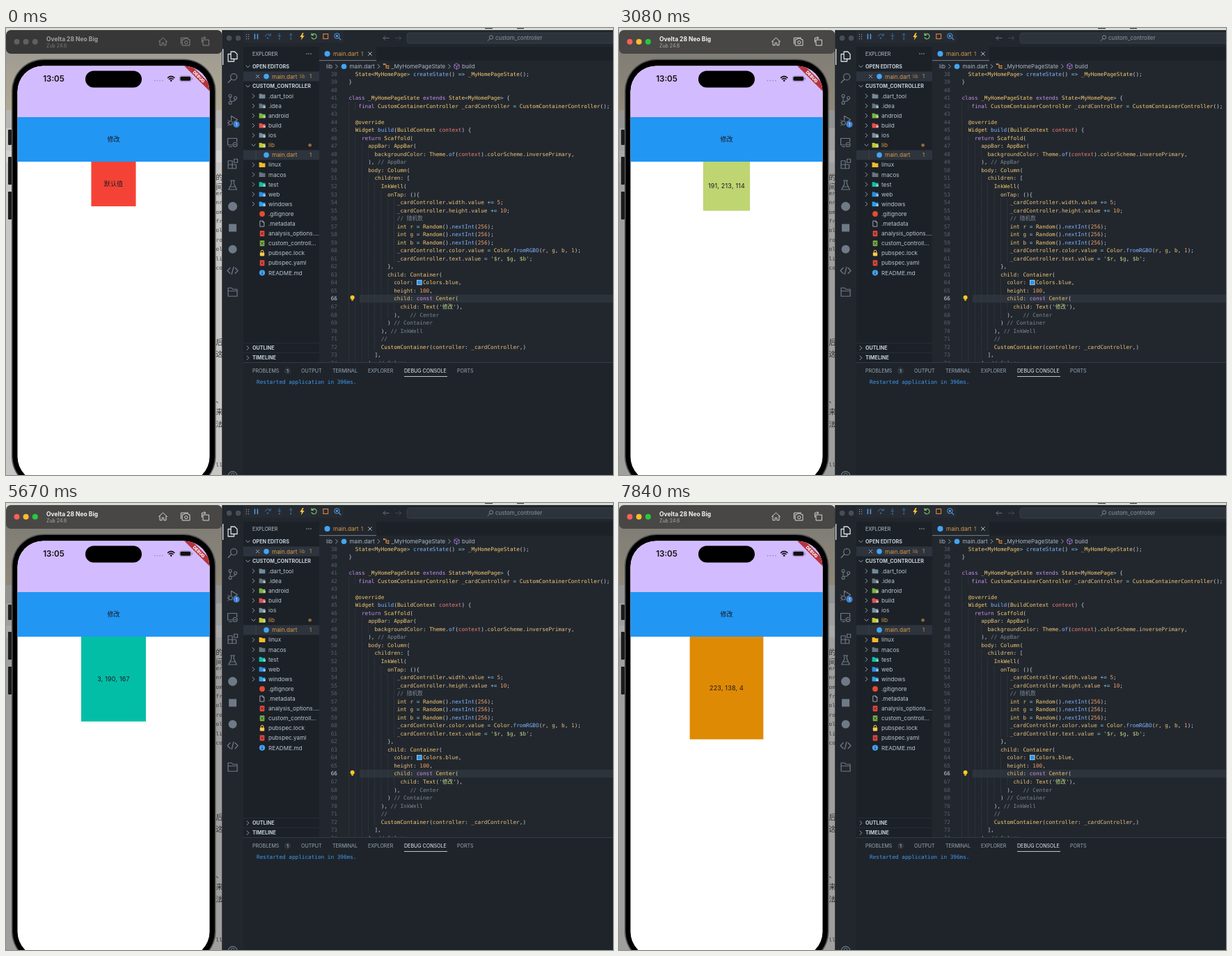
An HTML page that plays this animation: 872 px wide and 642 px high, repeating every 8000 ms.

```html
<!DOCTYPE html>
<html lang="zh">
<head>
<meta charset="utf-8">
<title>Container controller demo</title>
<style>
html, body { margin: 0; width: 100%; height: 100%; overflow: hidden; background: #22272e; }
svg { display: block; width: 872px; height: 642px; }
text { white-space: pre; font-family: Inter, "Noto Sans CJK SC", "Noto Sans CJK", sans-serif; }
.code { font: 7.69px "DejaVu Sans Mono", "Noto Sans CJK SC", "Noto Sans CJK", monospace; }
.line { fill: none; stroke-linecap: round; stroke-linejoin: round; }
</style>
</head>
<body>
<svg id="stage" viewBox="0 0 872 642"></svg>
<script>
const LOOP = 8000, FOCUS_AT = 2240, PT = 0.641;
// time of each tap, then the r, g, b it sets
const TAPS = [
  [2310, 191, 213, 114], [3360, 96, 148, 201], [3920, 214, 121, 160], [4480, 88, 196, 124],
  [4970, 143, 177, 225], [5110, 201, 92, 74], [5320, 120, 86, 190], [5460, 232, 187, 98],
  [5670, 3, 190, 167], [5880, 170, 64, 133], [6020, 76, 137, 58], [6230, 128, 203, 219],
  [6440, 223, 138, 4]
];

const esc = s => s.replace(/&/g, '&amp;').replace(/</g, '&lt;');
const rect = (x, y, w, h, fill, more = '') =>
  `<rect x="${x}" y="${y}" width="${w}" height="${h}" fill="${fill}" ${more}/>`;
const dot = (x, y, r, fill, more = '') => `<circle cx="${x}" cy="${y}" r="${r}" fill="${fill}" ${more}/>`;
const text = (x, mid, s, size, fill, more = '') =>
  `<text x="${x}" y="${mid + size * 0.36}" font-size="${size}" fill="${fill}" ${more}>${esc(s)}</text>`;
const line = (d, stroke, w = 1, more = '') =>
  `<path class="line" d="${d}" stroke="${stroke}" stroke-width="${w}" ${more}/>`;
const at = (x, y, s) => `<g transform="translate(${x} ${y})">${s}</g>`;
const bold = 'font-weight="700"', middle = 'text-anchor="middle"';
const chevron = (x, y, open) => line(open ? `M${x - 2.6} ${y - 1.4}l2.6 2.8 2.6-2.8` : `M${x - 1.4} ${y - 2.8}l2.8 2.8-2.8 2.8`, '#adbac7', 0.8);

function desktop() {
  const notes = [[214, '的'], [228, '间'], [451, '后,'], [468, '这在'], [534, '、'], [551, '来'], [569, '法是']];
  const bits = ['er', 'nr', 'om', 'fr', 'ol', 'ro', 'ol', 'li', 'co'];
  return rect(0, 0, 312, 642, '#dcdcda') + rect(0, 0, 872, 4, '#d9dcd2')
    + rect(0, 30, 312, 88, 'url(#sand)') + rect(0, 118, 312, 26, '#c9cac8') + rect(0, 176, 312, 17, '#e9e9e9')
    + rect(688, 0, 11, 1.2, '#3a3f44') + rect(734, 0, 10, 1.2, '#3a3f44')
    + notes.map(n => text(301.5, n[0], n[1], 10, '#3b3b3b')).join('')
    + bits.map((b, i) => text(301.5, 237 + i * 13.4, b, 7.5, '#4a4a4a', 'class="code"')).join('')
    + text(301.5, 627, 'll', 8, '#4a4a4a', 'class="code"')
    + rect(0, 30, 312, 612, '#000', 'id="shade"');
}

function phone() {
  const buttons = [[146, 22], [185, 40], [235, 40]].map(b => rect(3, b[0], 5, b[1], '#1b1b1c', 'rx="1"')).join('');
  const status = text(68.5, 73, '13:05', 11.6, '#111', `font-weight="600" ${middle}`)
    + rect(114, 61.5, 81, 24, '#000', 'rx="12"')
    + [213.5, 217.3, 221.1, 224.9].map(x => dot(x, 75.6, 0.9, '#9d8bbd')).join('')
    + line('M232.6 71.4q4.6-4 9.2 0M234.4 73.5q2.8-2.4 5.6 0', '#111', 1.6) + dot(237.2, 75.6, 1.3, '#111')
    + rect(249.3, 68.8, 17, 8, 'none', 'rx="2.6" stroke="#9583b3" stroke-width=".7"')
    + rect(250.3, 69.8, 15, 6, '#111', 'rx="1.8"') + rect(267, 71.4, 1.1, 2.8, '#9583b3', 'rx=".5"');
  const banner = `<g transform="translate(292.5 54.5) rotate(45)">${rect(-27, 17.9, 54, 7.8, '#b5333f')}`
    + text(0, 21.8, 'DEBUG', 6.2, '#fff', `font-weight="800" ${middle}`) + '</g>';
  return buttons + rect(8, 44.5, 293.5, 617, '#515254', 'rx="46"') + rect(9.6, 46, 290.3, 614, '#000', 'rx="44.5"')
    + `<g clip-path="url(#screen)">${rect(16, 54, 277, 600, '#fff')}${rect(16, 54, 277, 74, '#d3bbff')}`
    + rect(16, 128, 277, 64, '#2196f3') + text(154.5, 160, '修改', 9, '#1d1b20', middle)
    + rect(0, 192, 0, 0, '#f44336', 'id="box"') + text(154.5, 0, '', 9, '#1d1b20', `id="label" letter-spacing=".18" ${middle}`)
    + status + banner + '</g>';
}

function titleBar() {
  const icons = line('M219.5 19.6l6-5.6 6 5.6M221 18.8v6h3.2v-3.6h2.6v3.6h3.2v-6', 'currentColor', 1)
    + line('M251.4 22.5v-8.3h10.2M253.6 16.6h2.2l1-1.6h4l1 1.6h2.2v8.4h-10.4z', 'currentColor', 1)
    + dot(258.8, 20.6, 2.1, 'none', 'stroke="currentColor"')
    + line('M283.4 17h8v8h-8zM281.4 20.4v-6.2h5M284.8 12.4l1.8 1.8-1.8 1.8', 'currentColor', 1);
  return `<g id="bar">${rect(0, 3, 310.5, 34, 'currentColor', 'rx="7"')}</g>`
    + [15.5, 28.6, 41.8].map(x => dot(x, 19.8, 4, '#616061', 'class="light"')).join('')
    + `<g id="name">${text(58, 15.6, 'Ovelta 28 Neo Big', 8.5, 'currentColor', bold)}</g>`
    + `<g id="sub">${text(58, 25.2, 'Zub 24.6', 7, 'currentColor')}</g><g id="icons">${icons}</g>`;
}

function debugBar() {
  const b = '#4f9fe6', dim = '#3a6f9c';
  const grip = [-1.5, 1.5].map(x => [-3, 0, 3].map(y => dot(347 + x, 12.5 + y, 0.7, '#8b949e')).join('')).join('');
  return rect(341, 4, 144, 17, '#262b33', 'rx="2"') + grip
    + line('M357.4 9v6.5M361.4 9v6.5', b, 1.5)
    + line('M372.4 12a4 4 0 0 1 7.4-1.2m.4-2.6v2.8h-2.8', dim, 1) + dot(376, 14.6, 1.2, dim)
    + line('M392.8 7.8v5m-2-2l2 2 2-2', dim, 1) + dot(392.8, 15.4, 1.1, dim)
    + line('M409.2 13v-5m-2 2l2-2 2 2', dim, 1) + dot(409.2, 15.4, 1.1, dim)
    + '<path d="M426 7l-3.6 6h2.4l-1 4.6 4.8-6.6h-2.6l1.6-4z" fill="#ffc23d"/>'
    + line('M439.4 9.8a3.7 3.7 0 1 1-.4 3.8M439 7.8v2.6h2.6', '#7fc96b', 1.1)
    + rect(455.8, 8.6, 6.8, 6.8, 'none', 'stroke="#e0823d" stroke-width="1.1"')
    + dot(475.4, 11.4, 3.7, 'none', `stroke="${b}" stroke-width="1"`) + dot(475.4, 11.4, 1.6, b) + line('M478.2 14.2l2.6 2.6', b, 1.2);
}

function activityBar() {
  const c = '#6f7a86', hi = '#d7dde4';
  const icons = [
    line('M-2.5-7h5.5l3.5 3.5v7h-9zM-2.5-3.5h-4v10.5h8.5v-3.5', hi, 1.3),
    dot(1.6, -1.6, 4.6, 'none', `stroke="${c}" stroke-width="1.2"`) + line('M-1.8 1.8l-4.6 5', c, 1.3),
    [[-3.5, -5], [-3.5, 5], [4, -2]].map(p => dot(p[0], p[1], 2, 'none', `stroke="${c}" stroke-width="1.1"`)).join('') + line('M-3.5-3v6M4 0q0 3-7 3', c, 1.1),
    line('M-2-1v-6l9 5.5-5 3.3', c, 1.2) + dot(-3, 3, 2.8, 'none', `stroke="${c}" stroke-width="1.1"`) + line('M-7-1l2 2M-7.4 3h1.4M-7 7l2-2', c, 1),
    line('M-1 4h-6v-9.5h13v5M-5 6.5h4', c, 1.2) + dot(3.5, 3.5, 3, 'none', `stroke="${c}" stroke-width="1.1"`) + line('M2.3 3.5h2.4', c, 1),
    line('M-6.5-4h6v11h-6zM-6.5 1.5h11.5v5.5h-5.5M2-6.5h5v5h-5z', c, 1.2),
    line('M-3-6.5h6M-1.8-6.5v5l-4 8h11.6l-4-8v-5M-3.8 2.5h7.6', c, 1.2),
    dot(0, 0, 6.5, c), rect(-5.5, -5.5, 11, 11, c), dot(0, 0, 6, c),
    line('M-3.5-4l-4 4 4 4M3.5-4l4 4-4 4M1.3-5l-2.6 10', c, 1.3),
    line('M-6.5 6v-12h5l1.5 2h6.5v10zM-6.5-1.5h13', c, 1.2)
  ];
  return rect(311, 27, 30, 615, '#22272e') + rect(311, 30, 1.3, 23, '#e2e6ea')
    + icons.map((s, i) => at(325.6, 41 + i * 30.75, s)).join('')
    + dot(331, 138.5, 4.6, '#3f82d6') + text(331, 138.5, '1', 6, '#fff', middle)
    + dot(325.6, 643, 6.2, 'none', `stroke="${c}" stroke-width="1.2"`) + dot(325.6, 641.5, 2.2, 'none', `stroke="${c}"`);
}

const folder = (x, y, fill) => `<path d="M${x - 4.4} ${y - 3.4}h3.4l1.2 1.2h4.2v5.6h-8.8z" fill="${fill}"/>`;
const sheet = (x, y, c) => line(`M${x - 2.8} ${y - 4}h3.6l2 2v6h-5.6zM${x + 0.8} ${y - 4}v2h2`, c, 0.9);

function fileIcon(kind, x, y, c) {
  if (kind === 'dot') return dot(x, y, 3.9, c);
  if (kind === 'sheet') return sheet(x, y, c);
  if (kind === 'lock') return rect(x - 3.2, y - 1, 6.4, 5, c, 'rx=".8"') + line(`M${x - 1.8} ${y - 1}v-1.4a1.8 1.8 0 0 1 3.6 0v1.4`, c, 1);
  if (kind === 'info') return dot(x, y, 4.1, c) + line(`M${x} ${y - 0.2}v2.2M${x} ${y - 2.2}v.1`, '#1c2128', 1);
  return rect(x - 3.3, y - 4, 6.6, 8, c, 'rx=".8"') + line(`M${x - 1.6} ${y + 1.8}l3.2-3.6m-3.2 0l3.2 3.6`, '#1c2128', 0.8);
}

function sideBar() {
  const folders = { '.dart_tool': '#718b9b', '.idea': '#66757f', android: '#7cb342', build: '#e05252', ios: '#78909c', lib: '#c0ca33',
    linux: '#f6b92b', macos: '#66757f', test: '#11bfa5', web: '#2f8fe0', windows: '#2f9fe8' };
  const files = { '.gitignore': ['dot', '#e64a35'], '.metadata': ['sheet', '#a5b0ba'], 'analysis_options....': ['sq', '#f0483e'],
    'custom_controll...': ['sq', '#7cb342'], 'pubspec.lock': ['lock', '#ffca4a'], 'pubspec.yaml': ['sq', '#f0483e'], 'README.md': ['info', '#42a5f5'] };
  const head = (y, s, open) => chevron(347.5, y, open) + text(354, y, s, 7.2, '#c5d0da', bold);
  const mod = '#d99a45';
  let out = rect(341, 27, 109, 453, '#1c2128') + text(354, 37, 'EXPLORER', 7.1, '#b8c3ce')
    + [432, 435, 438].map(x => dot(x, 37, 0.75, '#adbac7')).join('')
    + head(55.3, 'OPEN EDITORS', true) + rect(341, 62.5, 109, 14, '#2d343d')
    + line('M359.2 67.2l4.6 4.6m0-4.6l-4.6 4.6', '#adbac7', 0.8) + dot(374, 69.6, 3.8, '#42a5f5')
    + text(382, 69.6, 'main.dart', 8.2, mod) + text(422, 69.8, 'lib', 7, '#b08447') + text(436, 69.6, '1', 7.5, mod)
    + head(83.6, 'CUSTOM_CONTROLLER', true);
  let y = 97.8;
  for (const [name, c] of Object.entries(folders)) {
    const lib = name === 'lib';
    out += chevron(355.5, y, lib) + folder(368, y, c) + text(377, y, name, 8.2, lib ? mod : '#b9c5d0');
    if (!['.dart_tool', 'linux', 'macos'].includes(name)) out += rect(369.5, y - 0.2, 3.4, 3.2, '#d5e0e6', 'opacity=".65" rx=".6"');
    y += 14.1;
    if (lib) {
      out += dot(436.6, y - 14.1, 2.4, '#8f6b3c') + rect(341, y - 7, 109, 14, '#2d343d') + line(`M359 ${y - 7}v14`, '#444c56', 0.6)
        + dot(374, y, 3.8, '#42a5f5') + text(382, y, 'main.dart', 8.2, mod) + text(436, y, '1', 7.5, mod);
      y += 14.1;
    }
  }
  for (const [name, [kind, c]] of Object.entries(files)) {
    out += fileIcon(kind, 368, y, c) + text(377, y, name, 8.2, '#b9c5d0');
    y += 14.1;
  }
  return out + rect(341, 452, 109, 0.6, '#2f363e') + head(459.5, 'OUTLINE') + rect(341, 466.3, 109, 0.6, '#2f363e') + head(473.7, 'TIMELINE');
}

// first line number is 38; each entry is [column, text]
const CODE = [
  [2, 'State<MyHomePage> createState() => _MyHomePageState();'], [0, '}'], [0, ''],
  [0, 'class _MyHomePageState extends State<MyHomePage> {'],
  [3, 'final CustomContainerController _cardController = CustomContainerController();'], [2, ''],
  [2, '@override'], [2, 'Widget build(BuildContext context) {'], [4, 'return Scaffold('], [6, 'appBar: AppBar('],
  [8, 'backgroundColor: Theme.of(context).colorScheme.inversePrimary,'], [6, '), // AppBar'], [6, 'body: Column('],
  [8, 'children: ['], [10, 'InkWell('], [12, 'onTap: (){'],
  [15, '_cardController.width.value += 5;'], [15, '_cardController.height.value += 10;'], [15, '// 随机数'],
  [15, 'int r = Random().nextInt(256);'], [15, 'int g = Random().nextInt(256);'], [15, 'int b = Random().nextInt(256);'],
  [15, '_cardController.color.value = Color.fromRGBO(r, g, b, 1);'], [15, "_cardController.text.value = '$r, $g, $b';"],
  [12, '},'], [12, 'child: Container('], [14, 'color:   Colors.blue,'], [14, 'height: 100,'], [14, 'child: const Center('],
  [16, "child: Text('修改'),"], [14, '),   // Center'], [12, ') // Container'], [10, '), // InkWell'], [10, '//'],
  [10, 'CustomContainer(controller: _cardController,)'], [8, '],'], [6, '), // Column']
];
const RULES = [
  [/^\/\/.*/, '#7d8793'], [/^'[^']*'/, '#c3d98a'], [/^@\w+/, '#f2c66d'],
  [/^(class|extends|final|return|const)\b/, '#c792ea'], [/^context\b/, '#f07f72'], [/^\d+/, '#f2a065'],
  [/^(_?[A-Z]\w*|int\b)/, '#f7cb72'], [/^\w+(?=\()/, '#82b4ff'], [/^\w+/, '#e8c27e'], [/^[=+>]+/, '#89cde8'], [/^[^\w'@\/=+>]+/, '#c3ccd6']
];
function paint(s) {
  let out = '';
  while (s) {
    const hit = RULES.find(r => r[0].test(s));
    const part = hit ? s.match(hit[0])[0] : s[0];
    out += `<tspan fill="${hit ? hit[1] : '#c3ccd6'}">${esc(part)}</tspan>`;
    s = s.slice(part.length);
  }
  return out;
}

function editor() {
  const X = 492.4, CH = 4.63, ROW = 11.53;
  const crumb = (x, s) => text(x, 55.2, s, 8.1, '#a9b5c1');
  let out = rect(450, 27, 422, 20, '#1c2128') + rect(450, 27, 82, 20, '#22272e') + rect(450, 46.3, 82, 0.8, '#8b949e')
    + dot(461.5, 37, 4, '#42a5f5') + text(470, 37, 'main.dart', 8.2, '#d99a45') + text(510, 37, '1', 7.5, '#d99a45')
    + line('M520.5 34.6l4.8 4.8m0-4.8l-4.8 4.8', '#d0d7de', 0.9)
    + crumb(460, 'lib') + chevron(475, 55.2) + dot(485.5, 55.2, 3.8, '#42a5f5') + crumb(493.5, 'main.dart') + chevron(535.5, 55.2)
    + line('M543 52h3v5.5h3M546 54.5h3', '#e8964a', 1) + dot(543, 52, 1.2, '#e8964a') + dot(549.5, 54.5, 1.1, '#e8964a') + dot(549.5, 57.5, 1.1, '#e8964a')
    + crumb(553.5, '_MyHomePageState') + chevron(637, 55.2)
    + line('M647.5 51.2l3.6 2v4l-3.6 2-3.6-2v-4zM644 53.2l3.5 2 3.5-2M647.5 55.2v4', '#b07fe0', 0.8) + crumb(655, 'build');
  out += '<g clip-path="url(#pane)">' + rect(508, 383, 364, 11.5, '#2d333b');
  CODE.forEach(([col, s], i) => {
    const mid = 65.9 + i * ROW, n = 38 + i;
    if (n > 41) for (let c = 0; c < col; c += 2) out += rect(X + c * CH, mid - 5.8, 0.6, ROW, '#343b44');
    out += `<text class="code" x="476" y="${mid + 2.7}" text-anchor="end" fill="${n === 66 ? '#cdd9e5' : '#57616c'}">${n}</text>`
      + `<text class="code" x="${X + col * CH}" y="${mid + 2.7}">${paint(s)}</text>`;
  });
  return out + rect(590.5, 362.2, 6.6, 6.6, '#2196f3', 'stroke="#e6edf3" stroke-width=".7"')
    + dot(497.6, 387, 3, '#ffca28') + rect(496.2, 389.4, 2.8, 2.4, '#d9a520', 'rx=".6"') + '</g>';
}

function panel() {
  const tab = (x, s, on) => text(x, 492.4, s, 7.1, on ? '#e6edf3' : '#9aa6b2');
  return rect(341, 480, 531, 162, '#1f242b') + rect(341, 480, 531, 0.8, '#3a424c')
    + tab(354, 'PROBLEMS') + dot(404.5, 492.4, 4.8, '#2d333b') + text(404.5, 492.4, '1', 6.5, '#dbe2e9', middle)
    + tab(424, 'OUTPUT') + tab(469, 'TERMINAL') + tab(520, 'EXPLORER') + tab(572, 'DEBUG CONSOLE', true) + tab(648, 'PORTS')
    + rect(572, 500, 62, 0.9, '#d0d7de')
    + '<text class="code" x="360" y="511" fill="#409cf0">Restarted application in 396ms.</text>';
}

function ide() {
  return rect(310.5, 3, 562, 640, '#22272e') + rect(310.5, 3, 0.6, 640, '#14171b')
    + dot(320.6, 14.6, 3.8, '#4a4e54') + dot(333.6, 14.6, 3.8, '#4a4e54')
    + line('M550 14.5h-8m3-3l-3 3 3 3', '#6b7580', 0.9) + line('M559.5 14.5h8m-3-3l3 3-3 3', '#434b54', 0.9)
    + rect(576, 7, 310, 15, '#2d333b', 'rx="4" stroke="#3e4650" stroke-width=".7"')
    + dot(697, 13.4, 2.6, 'none', 'stroke="#8b949e" stroke-width=".9"') + line('M695.2 15.4l-3 3', '#8b949e', 0.9)
    + text(703, 14.6, 'custom_controller', 8, '#8b949e')
    + activityBar() + sideBar() + editor() + panel() + debugBar();
}

const stage = document.getElementById('stage');
stage.innerHTML = '<defs><linearGradient id="sand" x2="0" y2="1"><stop stop-color="#b0ada3"/><stop offset="1" stop-color="#c6bba4"/></linearGradient>'
  + '<clipPath id="screen"><rect x="16.5" y="54.5" width="276" height="598" rx="37"/></clipPath>'
  + '<clipPath id="pane"><rect x="450" y="61.5" width="422" height="418.5"/></clipPath></defs>'
  + desktop() + phone() + titleBar() + ide();

const el = id => document.getElementById(id);
const lights = document.querySelectorAll('.light');
let shown = '';

function draw(t) {
  const taps = TAPS.filter(s => s[0] <= t).length, focus = t >= FOCUS_AT;
  if (shown === taps + '/' + focus) return;
  shown = taps + '/' + focus;
  const rgb = taps ? TAPS[taps - 1].slice(1).join(', ') : '';
  const w = (100 + 5 * taps) * PT, h = (100 + 10 * taps) * PT;
  const box = el('box'), label = el('label');
  box.setAttribute('x', 154.5 - w / 2);
  box.setAttribute('width', w);
  box.setAttribute('height', h);
  box.setAttribute('fill', rgb ? `rgb(${rgb})` : '#f44336');
  label.setAttribute('y', 192 + h / 2 + 3.2);
  label.textContent = rgb || '默认值';
  const tint = { bar: ['#383738', '#484745'], name: ['#a3a2a3', '#f2f2f2'], sub: ['#777', '#a9a8a9'], icons: ['#858485', '#d6d5d6'] };
  for (const id in tint) el(id).style.color = tint[id][+focus];
  // the active window casts a deeper shadow
  el('shade').setAttribute('opacity', focus ? 0.28 : 0.1);
  lights.forEach((l, i) => l.setAttribute('fill', focus ? ['#ff5f57', '#febc2e', '#28c840'][i] : '#616061'));
}

const start = performance.now();
function tick() {
  draw((performance.now() - start) % LOOP);
  requestAnimationFrame(tick);
}
tick();
</script>
</body>
</html>
```
